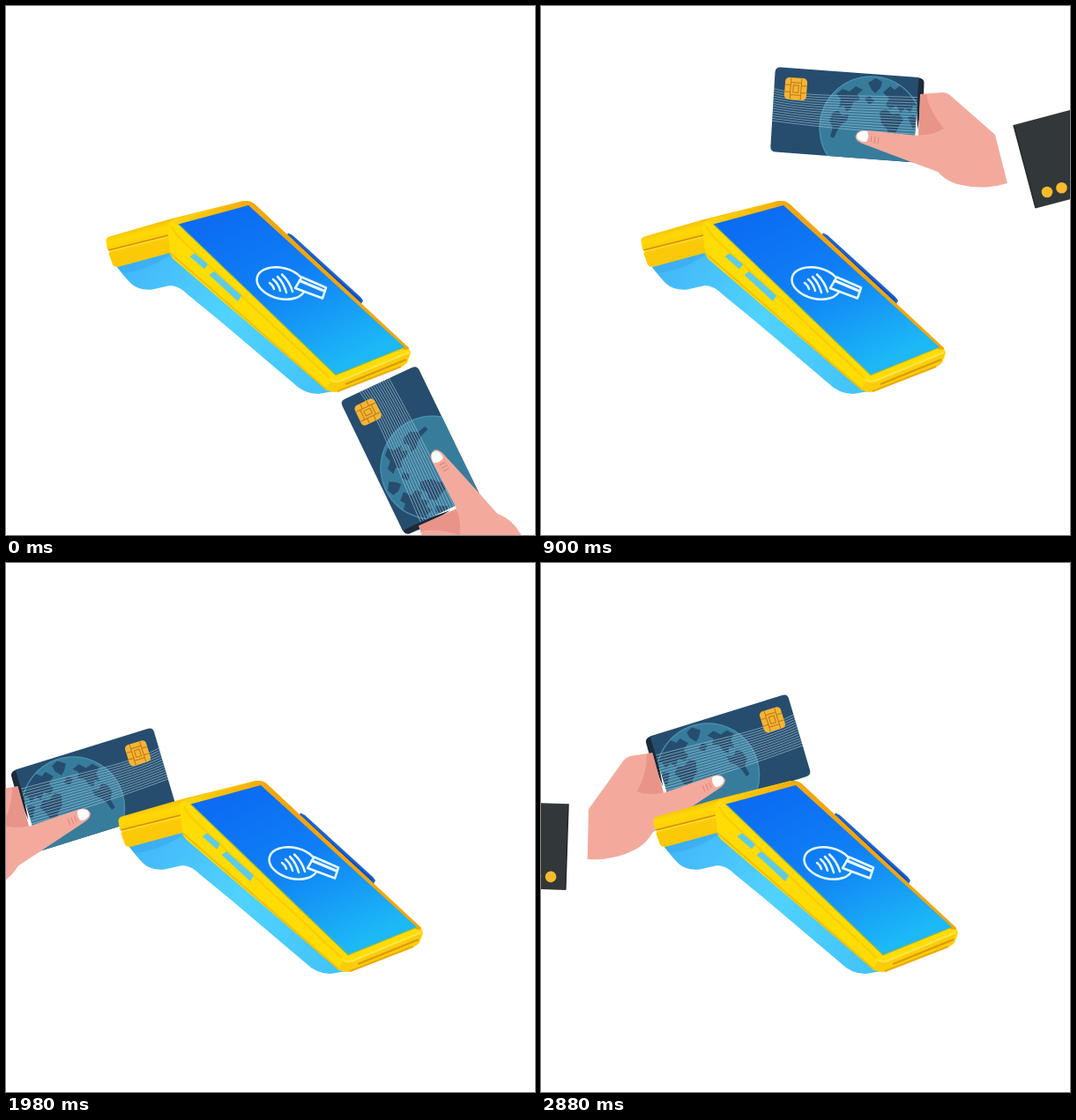
Write an HTML page that moves like this. It is 600 by 600 pixels and loops after 3.06 s.

```html
<!DOCTYPE html>
<html lang="en">
<head>
<meta charset="utf-8">
<title>Card payment</title>
<style>
html, body { margin: 0; width: 100%; height: 100%; overflow: hidden; background: #fff; }
svg { display: block; width: 100vw; height: 100vh; }
</style>
</head>
<body>
<svg viewBox="0 0 600 600">
  <defs>
    <linearGradient id="screen" gradientUnits="userSpaceOnUse" x1="270" y1="225" x2="365" y2="415">
      <stop offset="0" stop-color="#0c6cf3"/><stop offset=".45" stop-color="#0f7ff5"/><stop offset="1" stop-color="#1db8f6"/>
    </linearGradient>
    <linearGradient id="base" gradientUnits="userSpaceOnUse" x1="130" y1="295" x2="350" y2="440">
      <stop offset="0" stop-color="#42b6f8"/><stop offset=".5" stop-color="#50d3ff"/><stop offset="1" stop-color="#43c4fb"/>
    </linearGradient>
    <linearGradient id="top" gradientUnits="userSpaceOnUse" x1="180" y1="245" x2="300" y2="225">
      <stop offset="0" stop-color="#ffd90a"/><stop offset=".8" stop-color="#f4ab0c"/><stop offset="1" stop-color="#f2a40f"/>
    </linearGradient>
    <linearGradient id="back" gradientUnits="userSpaceOnUse" x1="150" y1="248" x2="156" y2="274">
      <stop offset="0" stop-color="#f5b90c"/><stop offset=".4" stop-color="#ffd806"/><stop offset="1" stop-color="#fbc907"/>
    </linearGradient>
    <clipPath id="cardClip"><path d="M272 69.500 L428.500 81 L422 177.300 L266 165.500 Q260 165 260.400 159 L265.500 75 Q266 69 272 69.500Z"/></clipPath>
  </defs>

  <g id="terminal">
    <path d="M318 261 L320 257.500 L325 260 L402 330 L405 334 L402 340Z" fill="#1b62d4"/>
    <path d="M319 260 L402 334" stroke="#0b48b4" stroke-width="1.500"/>
    <path d="M125 295 Q135 308 142 315 Q151 323 166 321.500 L186 317 Q196 317 207 328 L240 355 L325 427 Q338 440 354 440 L372 437 L350 400 L190 270Z" fill="url(#base)"/>
    <path d="M125 295 Q130 300 133 303 Q160 300 186 283 L184 278Z" fill="#3aa9ee" opacity=".65"/>
    <path d="M113.500 267 Q113 262.500 119 261 L183 242.500 L269 221 L274 222 L280 245 L200 292 L186 280 L127 296 Q122 296.500 120.500 292 L116.500 281 L118 277 L115 276Z" fill="url(#back)"/>
    <path d="M116 277 L184 260" stroke="#d98d06" stroke-width="1.600"/>
    <path d="M117 278.500 L184 262" stroke="#ffe34a" stroke-width="1"/>
    <path d="M183 250 Q183 245 190 242.500 L268 221.500 Q276 219.500 281 224 L457 389 Q460 392 458 397 L455 404 Q453 407 447 410 L378 437 Q370 439 363 435 L192 289 Q187 285 186 279Z" fill="#ffdc03"/>
    <path d="M186 244.500 L268 221.500 Q276 219.500 281 224 L457 389 L452 390 L276 227 L195.500 248Z" fill="url(#top)"/>
    <path d="M280 224.500 L456.500 389" fill="none" stroke="#f3a70c" stroke-width="2.500"/>
    <path d="M186 280 L365 436" fill="none" stroke="#f3bf08" stroke-width="2"/>
    <path d="M188 250 Q191 258 201 267 L367 422" fill="none" stroke="#fbcb08" stroke-width="2"/>
    <path d="M369 424 Q374 427 382 423 L458 392 L455 404 Q453 407 447 410 L378 437 Q370 439 363 435Z" fill="#fbcd08"/>
    <path d="M368 424 Q374 428 382 424 L457 393" fill="none" stroke="#ffe44a" stroke-width="2"/>
    <path d="M385 429 L454 401" stroke="#d99a0b" stroke-width="2"/>
    <path d="M376 437 L448 409" stroke="#eda90c" stroke-width="2"/>
    <path d="M195.500 247.500 L275 226 L452 387 L374 418.500Z" fill="url(#screen)"/>
    <path d="M195.500 247.500 L374 418.500 L452 387" fill="none" stroke="#8bb557" stroke-width="1.200"/>
    <g fill="#5ccbe6">
      <path d="M208.500 284 L214 280.500 L229 293 L225 298.500Z"/>
      <path d="M230.500 305 L236 301 L267 328.500 L263 335Z"/>
    </g>
    <g fill="none" stroke="#e8fbff" stroke-width="2.500" stroke-linecap="round" stroke-linejoin="round">
      <ellipse cx="312" cy="314.500" rx="28" ry="17.500" transform="rotate(14 312 314.500)"/>
      <path d="M299 314 Q303 317 304 321"/>
      <path d="M303 310 Q309 315 311 323"/>
      <path d="M308 307 Q315 314 318 325"/>
      <path d="M313 304.500 Q322 313 325 324"/>
      <path d="M335.500 307.500 L363 319.500 L359 331.500 L328 320Z" fill="#1685f4"/>
      <path d="M333 311.500 L361.500 323.500" stroke-width="3"/>
    </g>
  </g>

  <g id="hand">
    <path d="M536 135 L720 86 L745 181 L561 229.500Z" fill="#323739"/>
    <path d="M536 135 L561 229" stroke="#25292b" stroke-width="1.500"/>
    <g fill="#f8bb2d"><circle cx="574" cy="211" r="6.300"/><circle cx="590.500" cy="206.300" r="6.300"/><circle cx="607" cy="202" r="6.300"/></g>
    <path d="M425 81 L430 81.700 Q434.500 83 434.500 87 L434 100 L427 140Z" fill="#1c2a3a"/>
    <g clip-path="url(#cardClip)">
      <path d="M255 60 H445 V185 H255Z" fill="#264d6e"/>
      <circle cx="374.500" cy="138.500" r="59" fill="#387c9c"/>
      <g fill="#264d6e">
        <path d="M335 100 L342 94 L350 97 L357 91 L365 95 L359 100 L362 106 L354 109 L351 117 L346 120 L344 113 L338 115 L340 105Z"/>
        <path d="M331 121 L337 118 L341 124 L349 123 L347 130 L341 134 L336 141 L332 150 L328 148 L331 138 L327 130Z"/>
        <path d="M371 87 L380 82 L387 86 L385 93 L379 99 L375 95Z"/>
        <path d="M388 98 L396 91 L401 95 L409 89 L419 95 L427 105 L429 113 L422 113 L419 121 L413 116 L408 121 L403 113 L396 117 L391 112 L395 105Z"/>
        <path d="M367 105 L373 102 L378 108 L372 112Z"/>
        <path d="M384 120 L391 117 L399 123 L406 122 L411 129 L406 136 L402 145 L396 149 L392 139 L386 133Z"/>
        <path d="M416 126 L423 124 L428 132 L422 140Z"/>
      </g>
      <circle cx="374.500" cy="138.500" r="58.300" fill="none" stroke="#4b8eac" stroke-width="1.300"/>
      <g id="lines" fill="none" stroke="#a9c9d8" stroke-width=".8" opacity=".75"></g>
    </g>
    <g transform="rotate(4.200 289 94)">
      <rect x="276.500" y="81.500" width="25" height="25" rx="4.500" fill="#f6b436"/>
      <path d="M276.500 90 H283 M276.500 98 H283 M295 90 H301.500 M295 98 H301.500 M283 82 V106 M295 82 V106 M283 87 H295 M283 101 H295 M286 90 H292 V98 H286Z" fill="none" stroke="#b87813" stroke-width="1"/>
    </g>
    <path d="M430 100 L455 98 Q461 98 466 103 L515 146 L529 201 Q501 209.500 472 202 Q459 198 450 188 L420 177 L367 157 Q357 154 356.500 148 Q359 140 368 141 L428 147Z" fill="#f3aa9d"/>
    <path d="M430.500 100 L437 100 Q440 119 457 139 Q444 147 428 146.500Z" fill="#e99488"/>
    <path d="M358.500 145 Q363 140.500 370 142 Q373 148 369 154 Q362 154.500 358.500 150Z" fill="#fff"/>
    <path d="M375 147 L374 154 M379 148 L378 156 M383 149 L382 156" stroke="#d98579" stroke-width="1" fill="none"/>
  </g>
</svg>
<script>
const STEP = 180, COUNT = 17;
const svg = document.querySelector("svg");
const terminal = document.getElementById("terminal");
const hand = document.getElementById("hand");

// Fine wavy stripes on the card
const lines = document.getElementById("lines");
for (let i = 0; i < 14; i++) {
  const p = document.createElementNS("http://www.w3.org/2000/svg", "path");
  const a = 92 + i * 2.9, b = 104 + i * 3.2;
  p.setAttribute("d", `M258 ${a} C300 ${a + 13 - i * .6} 350 ${b - 4} 436 ${b}`);
  lines.append(p);
}

// Hand offsets, one per step
const insert = [[0, 0], [-2, -5], [-16, -10.5], [-30, -28], [-34, -52]];
const tap = [0, 6, 12, 30, 54, 116];
const swipe = [[-113, 38], [-87, 28], [-51, 14], [-36, 8.5], [-18, 4], [0, 0]];

// Mirrored pose, turned about a point between chip and thumb
const pose = (x, y, angle) =>
  `translate(${x} ${y}) rotate(${angle}) scale(1 -1) translate(-326.5 -121)`;

function place(handMove, front, shift) {
  hand.setAttribute("transform", handMove);
  terminal.setAttribute("transform", shift ? "translate(14 26)" : "");
  svg.append(front);
}

function show(k) {
  if (k < 5) {
    const [x, y] = insert[k];
    place(pose(449.5 + x, 485.5 + y, 68.4), terminal, false);
  } else if (k < 11) {
    place(`translate(0 ${tap[k - 5]})`, hand, false);
  } else {
    const [x, y] = swipe[k - 11];
    place(pose(232 + x, 212.5 + y, 167), terminal, true);
  }
}

const start = performance.now();
let last = -1;
function tick(now) {
  const k = Math.floor(Math.max(0, now - start) / STEP) % COUNT;
  if (k !== last) show(last = k);
  requestAnimationFrame(tick);
}
show(last = 0);
requestAnimationFrame(tick);
</script>
</body>
</html>
```
